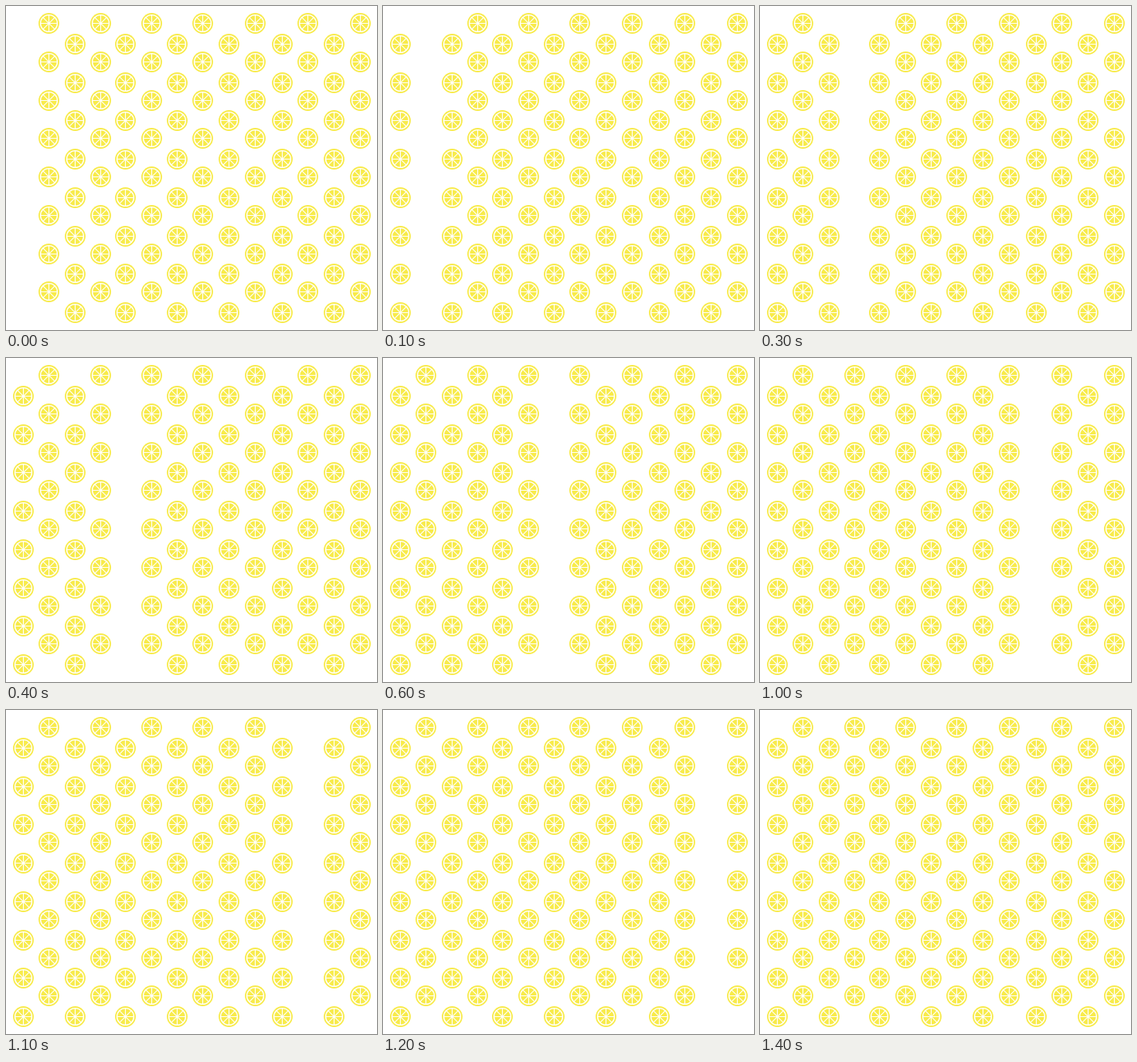
An HTML page with a canvas for the animation above (1900 ms loop, 480 by 420 pixels).

```html
<!DOCTYPE html>
<html lang="en">
<head>
<meta charset="utf-8">
<title>Lemon slices</title>
<style>
html, body { margin: 0; width: 100%; height: 100%; overflow: hidden; background: #fff; }
canvas { display: block; }
</style>
</head>
<body>
<canvas id="stage" width="480" height="420"></canvas>
<script>
const ctx = document.getElementById('stage').getContext('2d');

const LOOP = 1900, STEP = 100, ROWS = 8, ROW_GAP = 348 / 7;
const YELLOW = '#f8eb4b';
const columns = [22, 55, 89, 122, 154, 188, 221, 254, 288, 322, 357, 390, 424, 458];

function disc(radius, color) {
  ctx.fillStyle = color;
  ctx.beginPath();
  ctx.arc(0, 0, radius, 0, Math.PI * 2);
  ctx.fill();
}

function slice(x, y) {
  ctx.save();
  ctx.translate(x + 0.5, y + 0.5); // pixel centres keep the cross sharp
  disc(13.4, YELLOW);
  disc(11.6, '#fff');
  disc(10.2, YELLOW);

  // Four diameters divide the flesh into eight segments.
  ctx.strokeStyle = '#fff';
  ctx.lineWidth = 1.2;
  ctx.beginPath();
  for (let i = 0; i < 4; i++) {
    const angle = i * Math.PI / 4;
    const dx = 10.8 * Math.cos(angle), dy = 10.8 * Math.sin(angle);
    ctx.moveTo(-dx, -dy);
    ctx.lineTo(dx, dy);
  }
  ctx.stroke();
  disc(1.3, '#fff');
  ctx.restore();
}

function draw(time) {
  const hidden = Math.floor((time % LOOP) / STEP);
  ctx.fillStyle = '#fff';
  ctx.fillRect(0, 0, 480, 420);
  columns.forEach((x, col) => {
    if (col === hidden) return;
    const top = col % 2 ? 22.75 : 49.45;
    for (let row = 0; row < ROWS; row++) {
      slice(x, Math.floor(top + row * ROW_GAP));
    }
  });
}

const start = performance.now();
function tick() {
  draw(performance.now() - start);
  requestAnimationFrame(tick);
}
tick();
</script>
</body>
</html>
```
